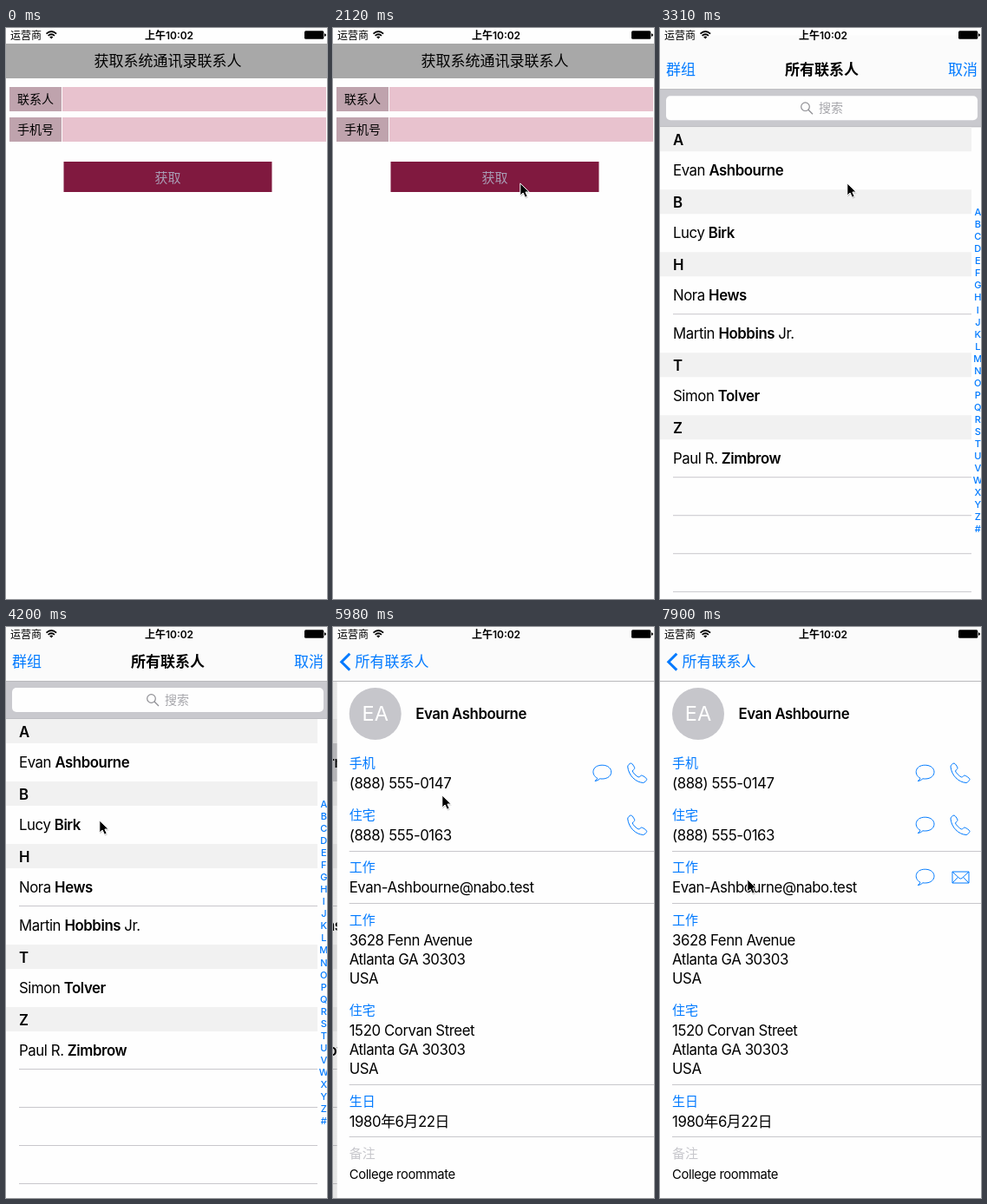
Recreate the animation shown at these times as an HTML page. Size 370x658 px, loop 8000 ms.

```html
<!DOCTYPE html>
<html lang="zh">
<head>
<meta charset="utf-8">
<title>获取系统通讯录联系人</title>
<style>
html, body { margin: 0; width: 100%; height: 100%; overflow: hidden; background: #fefefe; }
svg { display: block; width: 100vw; height: 100vh; }
text { font-family: Inter, "Noto Sans CJK SC", "Noto Sans CJK", sans-serif; white-space: pre; }
.latin { letter-spacing: -.025em; }
.bold { font-weight: 600; }
.icon { fill: none; stroke: #007aff; stroke-width: 1; stroke-linejoin: round; }
</style>
</head>
<body>
<svg id="stage" viewBox="0 0 370 658"></svg>
<script>
const BLUE = '#007aff', LINE = '#c8c7cc', LOOP = 8000, STEP = 148;

const rect = (x, y, w, h, fill, more = '') =>
  `<rect x="${x}" y="${y}" width="${w}" height="${h}" fill="${fill}" ${more}/>`;
const text = (x, y, size, str, fill = '#000', more = '') =>
  `<text x="${x}" y="${y}" font-size="${size}" fill="${fill}" ${more}>${str}</text>`;
const latin = (x, y, str, size = 16.8, cls = '') =>
  text(x, y, size, str, '#000', `class="latin ${cls}"`);
const rule = (x, y, end) => rect(x, y, end - x, 1, LINE);
const group = (id, body, more = '') => `<g id="${id}" ${more}>${body}</g>`;
const MIDDLE = 'text-anchor="middle"';

function statusBar() {
  return text(5, 12.5, 12, '运营商') +
    `<g fill="none" stroke="#000" stroke-width="1.7">
      <path d="M46.5 6.6Q52.3 1.4 58.1 6.6M48.6 8.9Q52.3 5.6 56 8.9"/></g>
     <path d="M50.2 10.2Q52.3 8.6 54.4 10.2L52.3 12.6Z"/>` +
    text(188, 12.5, 12, '上午10:02', '#000', `class="bold" ${MIDDLE}`) +
    rect(344, 3.3, 22.3, 9.5, '#000', 'rx="1.5"') +
    '<path d="M367 6.2Q369 6.6 369 8T367 9.8Z"/>';
}

function formPage() {
  const field = (y, label) =>
    rect(4, y, 60, 28, '#bfa3ad') + rect(65, y, 304, 28, '#e8c2ce') +
    text(13, y + 19.2, 14, label);
  return rect(0, 0, 370, 658, '#fefefe') + rect(0, 18, 370, 40, '#a8a8a8') +
    text(186.5, 44.2, 17, '获取系统通讯录联系人', '#000', MIDDLE) +
    field(68, '联系人') + field(103, '手机号') +
    rect(66.5, 154, 240, 35, '#80193f') +
    text(171.5, 177.6, 15, '获取', '#a99db5', 'id="action"');
}

function contactList() {
  const sections = {
    A: [['Evan', 'Ashbourne']],
    B: [['Lucy', 'Birk']],
    H: [['Nora', 'Hews'], ['Martin', 'Hobbins', 'Jr.']],
    T: [['Simon', 'Tolver']],
    Z: [['Paul R.', 'Zimbrow']]
  };
  let y = 106, rows = '';
  for (const [letter, people] of Object.entries(sections)) {
    rows += rect(0, y, 359, 28, '#f1f1f1') + latin(15, y + 20.5, letter, 16.8, 'bold');
    y += 28;
    people.forEach(([first, last, suffix = ''], i) => {
      if (i) rows += rule(15, y - 1, 359);
      rows += latin(15, y + 27.8, `${first} <tspan class="bold">${last}</tspan> ${suffix}`);
      y += 44;
    });
  }
  for (; y < 658; y += 44) rows += rule(15, y - 1, 359);
  const letters = [...'ABCDEFGHIJKLMNOPQRSTUVWXYZ#'].map((c, i) =>
    text(366.3, 208 + i * 14.04, 11, c, BLUE, `${MIDDLE} font-weight="500"`)).join('');
  const search = rect(0, 62, 370, 44, '#c9c9ce') + rect(0, 105, 370, 1, '#bcbcc1') +
    rect(7, 70, 359, 28, '#fefefe', 'rx="5"') +
    `<g fill="none" stroke="#8e8e93" stroke-width="1.2">
      <circle cx="167.5" cy="82.5" r="4.8"/><path d="M171 86L176 91"/></g>` +
    text(183, 89.2, 14, '搜索', '#a6a6ab');
  return group('search', search) +
    group('rows', rect(0, 134, 359, 44, '#c8c8cb', 'id="picked"') + rows + letters);
}

function detailPage() {
  const icon = (x, y, body) => `<g class="icon" transform="translate(${x} ${y})">${body}</g>`;
  const bubble = y => icon(305.5, y,
    '<path d="M-5.5 6.2C-13 2.5-12-8.8 0-8.8C14-8.8 14 7 0 7Q-1.5 7-2.6 6.8Q-5 9.4-8.3 9.5Q-5.8 8-5.5 6.2Z"/>');
  const phone = y => icon(346, y,
    `<path d="M-7-11C-9-11-11-8.5-11-7C-10 3-2 11 7 11.5C9 11 11 8.5 11 7.5C11 6 6 3 5 3
      C4 3 3 5 1.5 5C-1 4-5 0-5.5-2C-5-3.5-3-4-3-5.5C-3.5-7.5-6-11-7-11Z"/>`);
  const mail = y => icon(346.5, y,
    '<path d="M-9.5-6.5H9.5V6.5H-9.5ZL-1.5 1Q0 2.2 1.5 1L9.5-6.5M-9.5 6.5L-3-.3M9.5 6.5L3-.3"/>');
  const entry = (y, label, ...lines) => text(14, y + 5.3, 15, label, BLUE) +
    lines.map((s, i) => latin(14, y + 29.2 + i * 22, s)).join('');
  return rect(-9, 62, 9, 596, 'url(#edge)', 'id="shadow"') + rect(0, 62, 370, 596, '#fefefe') +
    '<circle cx="44" cy="100" r="30" fill="#c6c6cb"/>' +
    text(44, 108.3, 23.5, 'EA', '#fff', MIDDLE) +
    latin(90.5, 106, 'Evan Ashbourne', 16.8, 'bold') +
    entry(157, '手机', '(888) 555-0147') + entry(217, '住宅', '(888) 555-0163') +
    rule(14, 258, 370) + entry(277, '工作', 'Evan-Ashbourne@nabo.test') +
    rule(14, 318, 370) + entry(338, '工作', '3628 Fenn Avenue', 'Atlanta GA 30303', 'USA') +
    entry(442, '住宅', '1520 Corvan Street', 'Atlanta GA 30303', 'USA') +
    rule(14, 527, 370) + entry(546.5, '生日', '1980年6月22日') +
    rule(14, 587, 370) + text(14, 612, 15, '备注', '#c7c7cc') +
    latin(14, 636, 'College roommate', 14.8) +
    bubble(168) + phone(168) + phone(228) +
    group('lateIcons', bubble(228) + bubble(288) + mail(288.5));
}

function navBar() {
  return rect(0, 0, 370, 62, '#fbfbfb') + rect(0, 62, 370, 1, '#b9b9bc') +
    group('listNav', text(7, 46.2, 17, '群组', BLUE) + text(332, 46.2, 17, '取消', BLUE)) +
    text(186.5, 46.2, 17, '所有联系人', '#000', `id="title" class="bold" ${MIDDLE}`) +
    group('back', '<path d="M19.3 30.8L9.8 40.2L19.3 49.6" fill="none" stroke="#007aff" stroke-width="3"/>' +
      text(25.6, 46.2, 17, '所有联系人', BLUE, 'id="backLabel"'));
}

const ARROW = 'M.8 1V15L4.1 12L6.5 17.2L9.2 16L6.9 11H11.2Z';

document.getElementById('stage').innerHTML =
  `<defs><linearGradient id="edge"><stop offset="0" stop-opacity="0"/>
    <stop offset="1" stop-opacity=".2"/></linearGradient></defs>` +
  formPage() +
  group('sheet', rect(0, 0, 370, 658, '#fefefe') + contactList() +
    rect(0, 62, 370, 596, '#000', 'id="dim"') + group('detail', detailPage()) + navBar()) +
  statusBar() +
  group('cursor', `<path d="${ARROW}" transform="translate(.6 1.4)" opacity=".2"/>
    <path d="${ARROW}" stroke="#fff" stroke-width="1" stroke-linejoin="round"/>`);

const ui = {};
document.querySelectorAll('[id]').forEach(el => ui[el.id] = el);

// Pointer track: time, x, y
const track = [
  [648, 351, 318], [1092, 336, 352], [1832, 218, 206], [1980, 215, 180], [2128, 215, 178],
  [3460, 215, 178], [4052, 114, 246], [4200, 107, 222], [4792, 121, 158], [4940, 122, 156],
  [5680, 122, 156], [5976, 125, 193], [6716, 190, 110], [6864, 270, 65], [7012, 356, 140],
  [7160, 340, 340], [7308, 240, 500], [7456, 140, 545], [7604, 66, 470], [7752, 50, 360], [7900, 100, 290]
];

function pointer(t) {
  const i = track.findIndex(k => k[0] >= t);
  if (i < 0) return track[track.length - 1].slice(1);
  if (!i) return track[0].slice(1);
  const a = track[i - 1], b = track[i], u = (t - a[0]) / (b[0] - a[0]);
  return [a[1] + (b[1] - a[1]) * u, a[2] + (b[2] - a[2]) * u];
}

// Critically damped spring from 0 to 1
function spring(ms) {
  const s = Math.max(0, ms) * .0197;
  return 1 - (1 + s) * Math.exp(-s);
}

const clamp = v => Math.min(1, Math.max(0, v));
const move = (el, x, y) => el.setAttribute('transform', `translate(${x.toFixed(2)} ${y.toFixed(2)})`);
const fade = (el, v) => el.setAttribute('opacity', clamp(v).toFixed(3));

// The screen refreshes only every STEP ms
const refresh = ms => ms < 500 ? 0 : 500 + STEP * Math.floor((ms - 500 + 10) / STEP);

function draw(ms) {
  const t = refresh(ms);
  const rise = spring(t - 2988), push = spring(t - 5653);

  fade(ui.cursor, t >= 500 ? 1 : 0);
  move(ui.cursor, ...pointer(t));
  fade(ui.action, t < 2270 ? 1 : t < 2560 ? .3 : .3 + (t - 2560) / 220);

  move(ui.sheet, 0, t < 2988 ? 700 : 658 * (1 - rise));
  fade(ui.picked, t >= 5080 ? 1 : 0);

  move(ui.rows, -123 * push, 0);
  move(ui.search, -410 * push, 0);
  fade(ui.dim, push * .1);
  move(ui.detail, push ? 370 * (1 - push) : 400, 0);
  fade(ui.shadow, 1 - push);
  fade(ui.lateIcons, t >= 6110 ? 1 : 0);

  fade(ui.listNav, 1 - push * 2.3);
  move(ui.title, -95 * push, 0);
  fade(ui.title, 1 - push * 2.7);
  fade(ui.back, (push - .3) * 1.5);
  move(ui.backLabel, push > .98 ? 0 : 118 * (1 - push), 0);
}

function tick() {
  draw(performance.now() % LOOP);
  requestAnimationFrame(tick);
}
tick();
</script>
</body>
</html>
```
